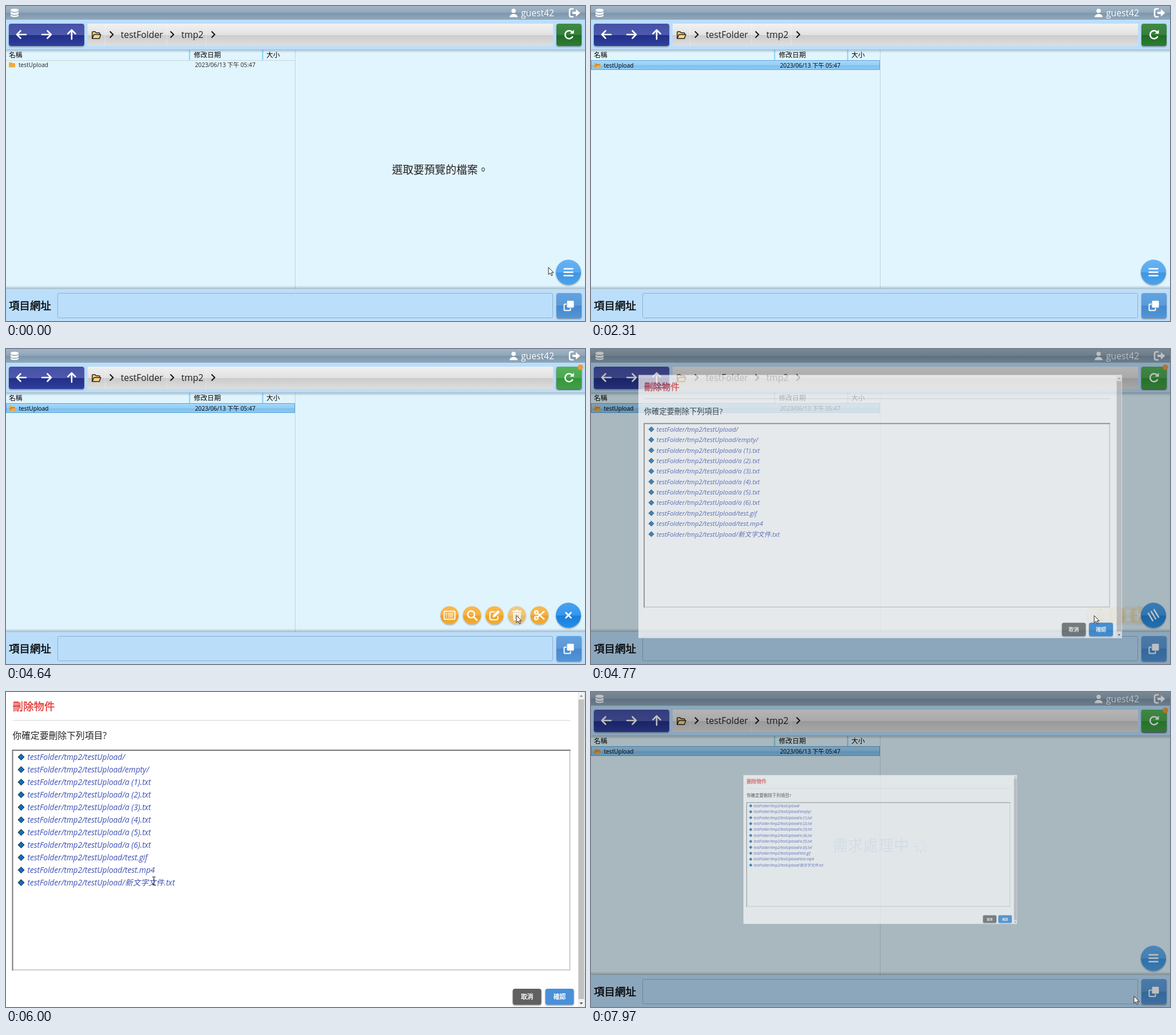
Recreate the animation shown at these times as an HTML page. Size 1014 by 552 pixels, loop 8000 ms.

```html
<!DOCTYPE html>
<html lang="zh-Hant">
<head>
<meta charset="utf-8">
<title>File manager</title>
<style>
  html, body { margin: 0; width: 100%; height: 100%; overflow: hidden; background: #e1f5fe; }
  svg { display: block; width: 100vw; height: 100vh; }
  text { font-family: 'Open Sans', 'Noto Sans CJK TC', 'Noto Sans CJK JP', 'Noto Sans CJK', sans-serif; white-space: pre; }
  .line { fill: none; stroke: #fff; stroke-width: 2.6; stroke-linecap: round; stroke-linejoin: round; }
  .white { fill: #fff; }
</style>
</head>
<body>
<svg id="stage" viewBox="0 0 1014 552"></svg>
<script>
const stage = document.getElementById('stage');

// ---------- markup helpers ----------
const gloss = (id, ...colors) => `<linearGradient id="${id}" x2="0" y2="1">${
  colors.map((c, i) => `<stop offset="${[0, .5, .51, 1][i]}" stop-color="${c}"/>`).join('')}</linearGradient>`;
const fade = (id, from, to) => `<linearGradient id="${id}" x2="0" y2="1">
  <stop stop-color="#37505f" stop-opacity="${from}"/><stop offset="1" stop-color="#37505f" stop-opacity="${to}"/></linearGradient>`;
const rect = (x, y, w, h, fill, more = '') => `<rect x="${x}" y="${y}" width="${w}" height="${h}" fill="${fill}" ${more}/>`;
const text = (x, y, size, str, more = '') => `<text x="${x}" y="${y}" font-size="${size}" ${more}>${str}</text>`;
const medium = color => `fill="${color}" stroke="${color}" stroke-width=".4"`;
const at = (x, y, body, more = '') => `<g transform="translate(${x} ${y})" ${more}>${body}</g>`;
const line = (d, more = '') => `<path class="line" d="${d}" ${more}/>`;
const button = (x, y, w, h, fill) => rect(x, y, w, h, fill, 'rx="4" filter="url(#drop)"');

const ARROW = 'M-8 0H8M-1.5-6.5L-8 0L-1.5 6.5';
const folder = (x, y) => at(x, y, '<path d="M0 1.5Q0 0 1.5 0H4L5.500 1.500H9.500Q11 1.500 11 3V8Q11 9 10 9H1Q0 9 0 8Z" fill="#f5a93b"/>');
const fileRow = (x, y) => text(x, y, 10.2, 'testUpload') + text(331, y, 10.2, '2023/06/13 下午 05:47');

// ---------- page ----------
const topBar = rect(0, 0, 1014, 24, 'url(#steel)')
  + at(15, 12, `<path class="white" d="M-7-5C-7-8 7-8 7-5V5C7 8-7 8-7 5Z"/>
      <path d="M-7-3C-5 0 5 0 7-3M-7 2C-5 5 5 5 7 2" fill="none" stroke="#8199ac" stroke-width="1.3"/>`)
  + at(889, 12, '<circle class="white" cy="-3.500" r="3.800"/><path class="white" d="M-7 7.500C-7 0 7 0 7 7.500Z"/>')
  + text(902, 18, 15.7, 'guest42', 'fill="#fff"')
  + at(996, 12, line('M-3-7H-6Q-9-7-9-4V4Q-9 7-6 7H-3', 'stroke-width="2"')
      + '<path class="white" d="M-4-2H2V-6.500L9.500 0L2 6.500V2H-4Z"/>');

const chevron = x => `<path d="M${x - 2.5} 45l5 5l-5 5" fill="none" stroke="#111" stroke-width="2" stroke-linecap="round"/>`;
const navBar = rect(0, 24, 1014, 52, '#bbdefb') + rect(0, 76, 1014, 6, 'url(#below)')
  + button(5, 31, 132, 39, 'url(#indigo)')
  + [[27, 0], [71, 180], [115, 90]].map(([x, a]) => at(x, 50, line(ARROW, `transform="rotate(${a})"`))).join('')
  + rect(143, 31, 815, 39, 'url(#silver)')
  + [173, 281, 350].map(x => rect(x, 31, 1, 39, '#fff', 'opacity=".35"')).join('')
  + at(150, 44, `<path d="M1 13V2Q1 1 2 1H6L8 3H13Q14 3 14 4V6" fill="#f8d57a" stroke="#222" stroke-width="1.5"/>
      <path d="M1 13L4 6H16L13.500 13Z" fill="#ffd878" stroke="#222" stroke-width="1.500" stroke-linejoin="round"/>`)
  + [185, 291, 363].map(chevron).join('')
  + text(201, 56, 15.75, 'testFolder', 'fill="#222"') + text(307, 56, 15.75, 'tmp2', 'fill="#222"')
  + button(964, 31, 44, 39, 'url(#green)')
  + `<g id="busy">${button(964, 31, 44, 39, 'url(#lime)')}<circle cx="1006" cy="32" r="4.800" fill="#f29a38"/></g>`
  + at(986, 50, line('M5.500-4.200A7 7 0 1 0 6 4', 'stroke-width="2.700"') + '<path class="white" d="M8.500-8.500V-1.500H1.500Z"/>');

const list = [[5, '名稱'], [329, '修改日期'], [456, '大小']].map(([x, s]) => text(x, 90, 11.8, s)).join('')
  + rect(320.5, 77, 2, 18, '#81d4fa') + rect(448.5, 77, 2, 18, '#81d4fa')
  + rect(0, 95, 506, 1, '#c9d4da') + rect(506, 77, 1, 419, '#c3d5df')
  + `<g id="plainRow" fill="#222">${folder(5, 98.5)}${fileRow(22, 107)}</g>
     <g id="pickedRow">${rect(.5, 95.5, 505, 16, 'url(#sky)', 'stroke="#5aa2d4"')}${folder(5.5, 99.5)}
       <path d="M7 107l1.500-4h7" fill="none" stroke="#8a6a35"/>${fileRow(22.5, 108)}</g>`
  + text(676, 294, 18.8, '選取要預覽的檔案。', 'id="hint" fill="#222" font-weight="300"');

const bottomBar = rect(0, 490, 1014, 6, 'url(#above)') + rect(0, 496, 1014, 56, '#bbdefb')
  + text(5, 532, 18.5, '項目網址', medium('#000'))
  + rect(90.5, 503.5, 867, 43, 'none', 'rx="2" stroke="#8db0cf"')
  + button(964, 503, 44, 44, 'url(#copy)')
  + at(986, 525, rect(-8.5, -2.5, 11, 11, 'none', 'class="line" style="stroke-width:2" rx="1"')
      + rect(-4, -9, 13, 13, '#fff', 'rx="2" stroke="#5b9bdb"'));

// ---------- floating menu ----------
const actions = [
  rect(-9.5, -7, 19, 14, 'none', 'class="line" style="stroke-width:2" rx="2"')
    + line('M-6-3h1M-2-3h8M-6 0h1M-2 0h8M-6 3h1M-2 3h8', 'style="stroke-width:1.700"'),
  '<circle class="line" cx="-1.500" cy="-1.500" r="6"/>' + line('M3 3L8.500 8.500'),
  line('M0-6H-5Q-8-6-8-3V5Q-8 8-5 8H3Q6 8 6 5V2', 'style="stroke-width:2.200"')
    + '<path class="white" d="M-3.500 4L-2.500 0L5-7.500Q7-9 8.500-7Q10-5.500 8-4L1 3Z"/>',
  '<path class="white" d="M-8-8H-3L-2-9.500H2L3-8H8V-5.500H-8ZM-7-4.500H7L6 9H-6Z"/>'
    + '<path d="M-3-2V6.500M0-2V6.500M3-2V6.500" stroke="#f39c12" stroke-width="1.300"/>',
  '<circle class="line" cx="-5.500" cy="-5" r="2.700"/><circle class="line" cx="-5.500" cy="5" r="2.700"/>'
    + line('M-3-3L8 6.500M-3 3L8-6.500')
].map(icon => `<g class="action"><circle r="15.800" fill="url(#orange)" filter="url(#drop)"/>${icon}</g>`).join('');
const menu = actions + at(985, 466.5, `<circle r="22" fill="url(#blue)" filter="url(#drop)"/>
  <circle id="veil" r="22" fill="#fff"/>
  ${line('M-7.500-6H7.500M-7.500 0H7.500M-7.500 6H7.500', 'id="bars"')}${line('M-4.500-4.500L4.500 4.500M-4.500 4.500L4.500-4.500', 'id="cross"')}`);

// ---------- dialog ----------
const files = ['', 'empty/', ...[1, 2, 3, 4, 5, 6].map(n => `a (${n}).txt`), 'test.gif', 'test.mp4', '新文字文件.txt'];
const items = files.map((name, i) => {
  const y = 114 + i * 22;
  return `<path d="M21.500 ${y}l5.500-5.500 5.500 5.500-5.500 5.500z" fill="#0b6fc2" stroke="#222"/>`
    + text(38, y + 5, 13.7, 'testFolder/tmp2/testUpload/' + name, 'font-style="italic" fill="#3f51b5"');
}).join('');
const dialogButton = (x, fill, label, overlay = '') => button(x, 520, 50, 28, fill) + overlay
  + text(x + 25, 538, 10.8, label, 'text-anchor="middle" ' + medium('#fff'));
const dialog = rect(0, 0, 1014, 552, '#fff')
  + text(12, 31.5, 18.5, '刪除物件', medium('#e53935'))
  + rect(12, 49, 977, 1.5, '#e0e0e0')
  + text(12, 81.5, 15.8, '你確定要刪除下列項目?', 'fill="#222"')
  + '<path d="M988 101V487H12" fill="none" stroke="#ccc" stroke-width="2"/><path d="M12 488V102H989" fill="none" stroke="#767676" stroke-width="2"/>'
  + items + dialogButton(888, '#616161', '取消')
  + dialogButton(945, '#4a90d9', '確認', rect(945, 520, 50, 28, '#1e7fd8', 'id="confirmHover" rx="4"'))
  + rect(1002, 0, 12, 552, '#f1f1f1') + rect(1003, 13, 10, 525, '#c1c1c1')
  + '<path d="M1005 8.500l3-3.500 3 3.500z" fill="#999"/><path d="M1005 544l3 3.500 3-3.500z" fill="#555"/>';

const spinner = [0, 45, 90, 135, 180, 225, 270, 315].map(a =>
  `<path d="M0-6V-11" stroke="#6f9de0" stroke-width="2" stroke-linecap="round" transform="rotate(${a})" opacity="${.3 + a / 450}"/>`).join('');

stage.innerHTML = `<defs>
  ${gloss('steel', '#a3b6c6', '#8fa6b9', '#7d96ab', '#91a9bc')}
  ${gloss('indigo', '#4450a6', '#4f5aae', '#222f86', '#303f9f')}
  ${gloss('silver', '#f1f1f1', '#e2e2e2', '#cbcbcb', '#dfdfdf')}
  ${gloss('green', '#3f8a43', '#35803a', '#206b26', '#2e7d32')}
  ${gloss('lime', '#55b35a', '#49aa4e', '#329838', '#43a047')}
  ${gloss('sky', '#a9d9fb', '#94cef7', '#7dbfed', '#8fcaf6')}
  ${gloss('copy', '#64a3df', '#5a9ad9', '#4489ce', '#5395d7')}
  ${gloss('blue', '#47a3f0', '#3797ec', '#1a80dc', '#2490ea')}
  ${gloss('orange', '#ffb02e', '#fca520', '#f09300', '#fb9f0a')}
  ${fade('below', .35, 0)}${fade('above', 0, .35)}
  <filter id="drop" x="-20%" y="-20%" width="140%" height="150%"><feDropShadow dx="0" dy="1.500" stdDeviation="1.200" flood-opacity=".4"/></filter>
</defs>
${rect(0, 0, 1014, 552, '#e1f5fe')}${list}${navBar}${topBar}${bottomBar}${menu}
${rect(0, 0, 1014, 552, '#000', 'id="backdrop"')}
<g id="dialog">${dialog}</g>
<g id="waiting">${text(423, 279, 26.8, '需求處理中', 'fill="#6f9de0"')}${at(577, 271, `<g id="spinner">${spinner}</g>`)}</g>
<g id="pointer">
  <path id="arrow" d="M0 0V12.500L3 9.800L5.200 14.600L7.200 13.700L5.100 9.200H9Z" fill="#fff" stroke="#111" stroke-width=".9"/>
  <path id="beam" d="M-3-7H-1L0-6L1-7H3M0-6V6M-3 7H-1L0 6L1 7H3" fill="none" stroke="#222" stroke-width="1.100"/>
</g>`;

// ---------- motion ----------
const el = Object.fromEntries([...stage.querySelectorAll('[id]')].map(n => [n.id, n]));
const actionNodes = [...stage.querySelectorAll('.action')];
const ramp = (t, a, b) => Math.min(1, Math.max(0, (t - a) / (b - a)));
const inOut = p => p < .5 ? 4 * p ** 3 : 1 - 4 * (1 - p) ** 3;
const opacity = (node, v) => node.setAttribute('opacity', v);
const move = (node, v) => node.setAttribute('transform', v);

// time, x, y
const track = [
  [0, 950, 458], [140, 950, 458], [400, 968, 464], [680, 978, 466], [820, 978, 466], [1040, 520, 300],
  [1290, 100, 136], [1430, 56, 110], [1560, 48, 106], [2030, 48, 106], [2310, 1016, 436], [2580, 1016, 452],
  [2650, 986, 465], [3000, 986, 465], [3320, 894, 497], [3450, 894, 497], [3700, 872, 480], [4130, 894, 467],
  [4640, 894, 467], [4770, 881, 467], [5080, 940, 524], [5320, 965, 531], [5390, 955, 520], [5620, 330, 190],
  [5740, 146, 108], [6000, 259, 331], [6140, 259, 331], [6550, 860, 490], [6890, 951, 533], [8000, 951, 533]
];
function pointerAt(t) {
  const i = track.findIndex(k => k[0] > t);
  const [t0, x0, y0] = track[i - 1], [t1, x1, y1] = track[i], p = (t - t0) / (t1 - t0);
  return [x0 + (x1 - x0) * p, y0 + (y1 - y0) * p];
}

function draw(t) {
  const [x, y] = pointerAt(t);
  const overText = t > 5600 && t < 6300;
  move(el.pointer, `translate(${x} ${y})`);
  opacity(el.arrow, overText ? 0 : 1);
  opacity(el.beam, overText ? 1 : 0);

  const picked = ramp(t, 1630, 1780);
  opacity(el.plainRow, 1 - picked);
  opacity(el.pickedRow, picked);
  opacity(el.hint, 1 - ramp(t, 1630, 1830));

  // the menu slides out of its round button and back into it
  const opening = ramp(t, 2650, 2970), closing = ramp(t, 4610, 4930);
  const open = inOut(opening) - inOut(closing);
  const shown = Math.min(1, opening * 2) * Math.max(0, 1 - closing * 1.6);
  actionNodes.forEach((node, i) => {
    move(node, `translate(${985 - (209 - i * 39.5) * open} 466.5)`);
    opacity(node, shown * (i === 3 && t > 4000 ? 1 - .3 * ramp(t, 4520, 4620) : 1));
  });
  opacity(el.bars, open > .55 ? 0 : 1);
  opacity(el.cross, open > .55 ? 1 : 0);
  move(el.bars, `rotate(${open * 120})`);
  move(el.cross, `rotate(${(open - 1) * 120})`);
  const hover = ramp(t, 300, 500) - ramp(t, 1300, 1560) + ramp(t, 2580, 2700) - ramp(t, 3100, 3320)
    + ramp(t, 3600, 3800) - ramp(t, 4700, 5000);
  opacity(el.veil, .17 * (1 - hover));
  opacity(el.busy, t >= 4600 ? 1 : 0);

  const enter = ramp(t, 4640, 4930), leave = ramp(t, 7790, 8014);
  const scale = 1 - (1 - enter) ** 3 - leave ** 3;
  opacity(el.backdrop, .25 * ramp(t, 4640, 4740));
  opacity(el.dialog, 1 - (1 - enter) ** 2 - leave ** 5);
  move(el.dialog, `translate(506.5 276) scale(${scale}) translate(-507 -276)`);
  opacity(el.confirmHover, 1 - ramp(t, 5390, 5550) + .6 * ramp(t, 6780, 6890));

  opacity(el.waiting, .12 * ramp(t, 7850, 7970));
  move(el.spinner, `rotate(${Math.floor(t / 100) * 45})`);
}

const start = performance.now();
function tick() {
  draw((performance.now() - start) % 8000);
  requestAnimationFrame(tick);
}
tick();
</script>
</body>
</html>
```
